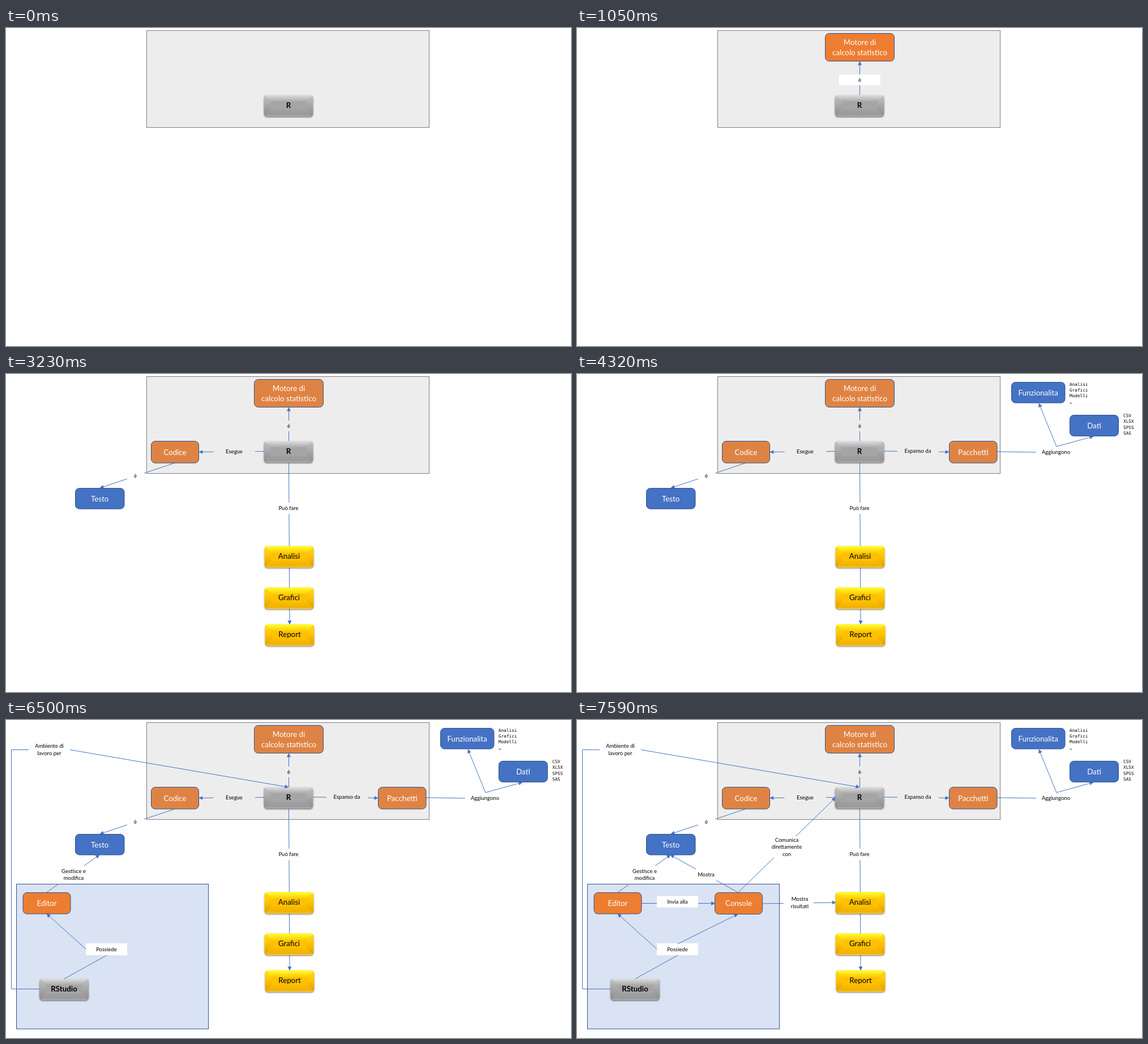
Write an HTML page that moves like this. It is 998 px wide and 561 px high and loops after 8 s.

```html
<!DOCTYPE html>
<html lang="it">
<head>
<meta charset="utf-8">
<title>Mappa concettuale di R</title>
<style>
html, body { margin: 0; width: 100%; height: 100%; overflow: hidden; background: #fff; }
svg { display: block; width: 100vw; height: 100vh; }
text { font-family: Lato, sans-serif; text-anchor: middle; }
.title { font-size: 13.3px; }
.bold { font-weight: 700; }
.label { font-size: 9.5px; }
.list { font: 7.7px "DejaVu Sans Mono", monospace; text-anchor: start; }
.wire { fill: none; stroke: #4472c4; }
.box { stroke: #2f528f; }
.stage { animation: 8s step-end infinite; }
#stage1 { animation-name: show1; }
#stage2 { animation-name: show2; }
#stage3 { animation-name: show3; }
#stage4 { animation-name: show4; }
#stage5 { animation-name: show5; }
#stage6 { animation-name: show6; }
#stage7 { animation-name: show7; }
.engine { animation: engine 8s step-end infinite; }
.plate { animation: plate 8s step-end infinite; }
@keyframes show1 { 0% { opacity: 0 } 13.125%, 100% { opacity: 1 } }
@keyframes show2 { 0% { opacity: 0 } 26.75%, 100% { opacity: 1 } }
@keyframes show3 { 0% { opacity: 0 } 40.375%, 100% { opacity: 1 } }
@keyframes show4 { 0% { opacity: 0 } 54%, 100% { opacity: 1 } }
@keyframes show5 { 0% { opacity: 0 } 67.625%, 100% { opacity: 1 } }
@keyframes show6 { 0% { opacity: 0 } 81.25%, 100% { opacity: 1 } }
@keyframes show7 { 0% { opacity: 0 } 94.875%, 100% { opacity: 1 } }
@keyframes engine { 0% { fill: #ed7d31 } 40.375%, 100% { fill: #df8344 } }
@keyframes plate { 0% { fill: #fff } 40.375%, 100% { fill: #ededed } }
</style>
</head>
<body>
<svg id="map" viewBox="0 0 998 561">
  <defs>
    <marker id="head" markerUnits="userSpaceOnUse" markerWidth="8" markerHeight="8" refX="6.5" refY="3.5" orient="auto">
      <path d="M0 0 L7 3.5 L0 7Z" fill="#4472c4"/>
    </marker>
    <clipPath id="round"><rect width="87" height="38" rx="6"/></clipPath>
    <filter id="shadow" x="-10%" y="-10%" width="120%" height="135%">
      <feDropShadow dx="0" dy="1.5" stdDeviation="1.3" flood-opacity=".5"/>
    </filter>
    <linearGradient id="greyTop" x2="0" y2="1"><stop stop-color="#e0e0e0"/><stop offset="1" stop-color="#a8a8a8"/></linearGradient>
    <linearGradient id="greySide" x2="0" y2="1"><stop stop-color="#c4c4c4"/><stop offset=".5" stop-color="#a6a6a6"/><stop offset="1" stop-color="#8c8c8c"/></linearGradient>
    <linearGradient id="greyLow" x2="0" y2="1"><stop stop-color="#a0a0a0"/><stop offset="1" stop-color="#989898"/></linearGradient>
    <linearGradient id="goldTop" x2="0" y2="1"><stop stop-color="#ffff2c"/><stop offset="1" stop-color="#ffcb08"/></linearGradient>
    <linearGradient id="goldSide" x2="0" y2="1"><stop stop-color="#ffe016"/><stop offset=".5" stop-color="#fdc004"/><stop offset="1" stop-color="#d99f00"/></linearGradient>
    <linearGradient id="goldLow" x2="0" y2="1"><stop stop-color="#f9bb00"/><stop offset="1" stop-color="#efb000"/></linearGradient>
  </defs>
</svg>
<script>
const ORANGE = '#ed7d31', SOFT_ORANGE = '#df8344', BLUE = '#4472c4', PANEL = '#ededed';
const map = document.getElementById('map');

const rect = (x, y, w, h, attrs) => `<rect x="${x}" y="${y}" width="${w}" height="${h}" ${attrs}/>`;
const wire = d => `<path class="wire" d="${d}"/>`;
const arrow = d => `<path class="wire" marker-end="url(#head)" d="${d}"/>`;

// Lines of text centred on (x, y)
const lines = (rows, x, y, step, drop, attrs) => rows.split('|').map((row, i, all) =>
  `<text x="${x}" y="${y + drop + (i - (all.length - 1) / 2) * step}" ${attrs}>${row}</text>`).join('');
const label = (rows, x, y) => lines(rows, x, y, 12.5, 3.2, 'class="label"');
const list = (rows, x, y) => lines(rows, x, y, 10.2, 2.8, 'class="list"');
const plate = (x, y, w, h, fill = '#fff', cls = '') => rect(x, y, w, h, `fill="${fill}" class="${cls}"`);

const node = (rows, x, y, w, h, fill, cls = '') =>
  rect(x, y, w, h, `rx="7" fill="${fill}" class="box ${cls}"`) +
  lines(rows, x + w / 2, y + h / 2, 18, 4.8, 'class="title" fill="#fff"');

const button = (text, x, y, tone, cls = '') => `
  <g transform="translate(${x} ${y})">
    <g filter="url(#shadow)"><g clip-path="url(#round)">
      <rect width="87" height="38" fill="${tone === 'grey' ? '#a5a5a5' : '#ffc000'}"/>
      <path d="M0 0H87L75 12H12Z" fill="url(#${tone}Top)"/>
      <path d="M0 0L12 12V26L0 38Z M87 0L75 12V26L87 38Z" fill="url(#${tone}Side)"/>
      <path d="M0 38L12 26H75L87 38Z" fill="url(#${tone}Low)"/>
      <path d="M5 37H82" stroke="#fff" stroke-opacity=".35"/>
    </g></g>
    ${lines(text, 43.5, 18.3, 18, 4.6, `class="title ${cls}"`)}
  </g>`;

const stages = [
  rect(248.5, 4.5, 499, 171, `fill="${PANEL}" stroke="#7f7f7f"`) +
  button('R', 455.5, 118, 'grey', 'bold'),

  arrow('M499.5 118V59') +
  plate(463, 82, 73, 19, '#fff', 'plate') + label('è', 499.5, 91.5) +
  node('Motore di|calcolo statistico', 438.5, 9.5, 122, 49, ORANGE, 'engine'),

  arrow('M499.5 156L501 441.5') +
  plate(463, 227, 73, 20) + label('Può fare', 499, 237) +
  button('Analisi', 456.5, 303.5, 'gold') +
  button('Grafici', 456.5, 376.5, 'gold') +
  button('Report', 457.5, 441.5, 'gold'),

  arrow('M456 136.5L341 137.5') +
  plate(366.5, 127, 73.5, 20, PANEL) + label('Esegue', 403, 137) +
  arrow('M298 157L166 201') +
  plate(214, 170, 30, 20) + label('è', 228.5, 179.5) +
  node('Codice', 256.5, 118.5, 84, 38.5, SOFT_ORANGE) +
  node('Testo', 122.5, 201.5, 86.5, 36.5, BLUE),

  arrow('M542.5 136L657 137.5') +
  plate(566, 126, 73, 20, PANEL) + label('Espanso da', 602, 135.5) +
  wire('M742 137L811 138') + arrow('M847 128L816 52') + arrow('M847 128L912 110') +
  label('Aggiungono', 846, 138) +
  node('Pacchetti', 657.5, 118.5, 84.5, 38.5, SOFT_ORANGE) +
  node('Funzionalita', 767.5, 14.5, 94.5, 36.5, BLUE) +
  node('Dati', 870.5, 72.5, 86, 37, BLUE) +
  list('Analisi|Grafici|Modelli|…', 870, 33.5) +
  list('CSV|XLSX|SPSS|SAS', 965, 88.7),

  rect(18.5, 289.5, 339, 255.5, 'fill="#dae3f3" class="box"') +
  wire('M59.5 474.5H9.5V52.5H40') + arrow('M113 52.5L499 118.5') +
  label('Ambiente di|lavoro per', 76.5, 52.5) +
  button('RStudio', 59, 456, 'grey', 'bold'),

  arrow('M72 304L165 238') +
  plate(83, 257, 73, 32) + label('Gestisce e|modifica', 119.5, 273) +
  wire('M103 456.5L178 415') + arrow('M142 405L72 342') +
  plate(141, 394, 73, 21) + label('Possiede', 177.5, 404.5) +
  node('Editor', 30, 304.5, 84, 37.5, ORANGE),

  arrow('M114 323.5H243.5') +
  plate(141, 310.5, 73, 20) + label('Invia alla', 177.5, 320.5) +
  arrow('M178 395L284 342.5') +
  arrow('M284 304L165 238') +
  plate(192, 263, 73, 20) + label('Mostra', 228, 273) +
  arrow('M285 304L456.5 137') +
  plate(334, 205, 73, 38) + label('Comunica|direttamente|con', 370.5, 224) +
  arrow('M327 324L457 322') +
  plate(365, 309, 53, 28) + label('Mostra|risultati', 393.5, 322.5) +
  node('Console', 243.5, 304.5, 84, 38, ORANGE)
];

map.insertAdjacentHTML('beforeend', stages.map((parts, i) =>
  `<g class="stage" id="stage${i}">${parts}</g>`).join(''));
</script>
</body>
</html>
```
